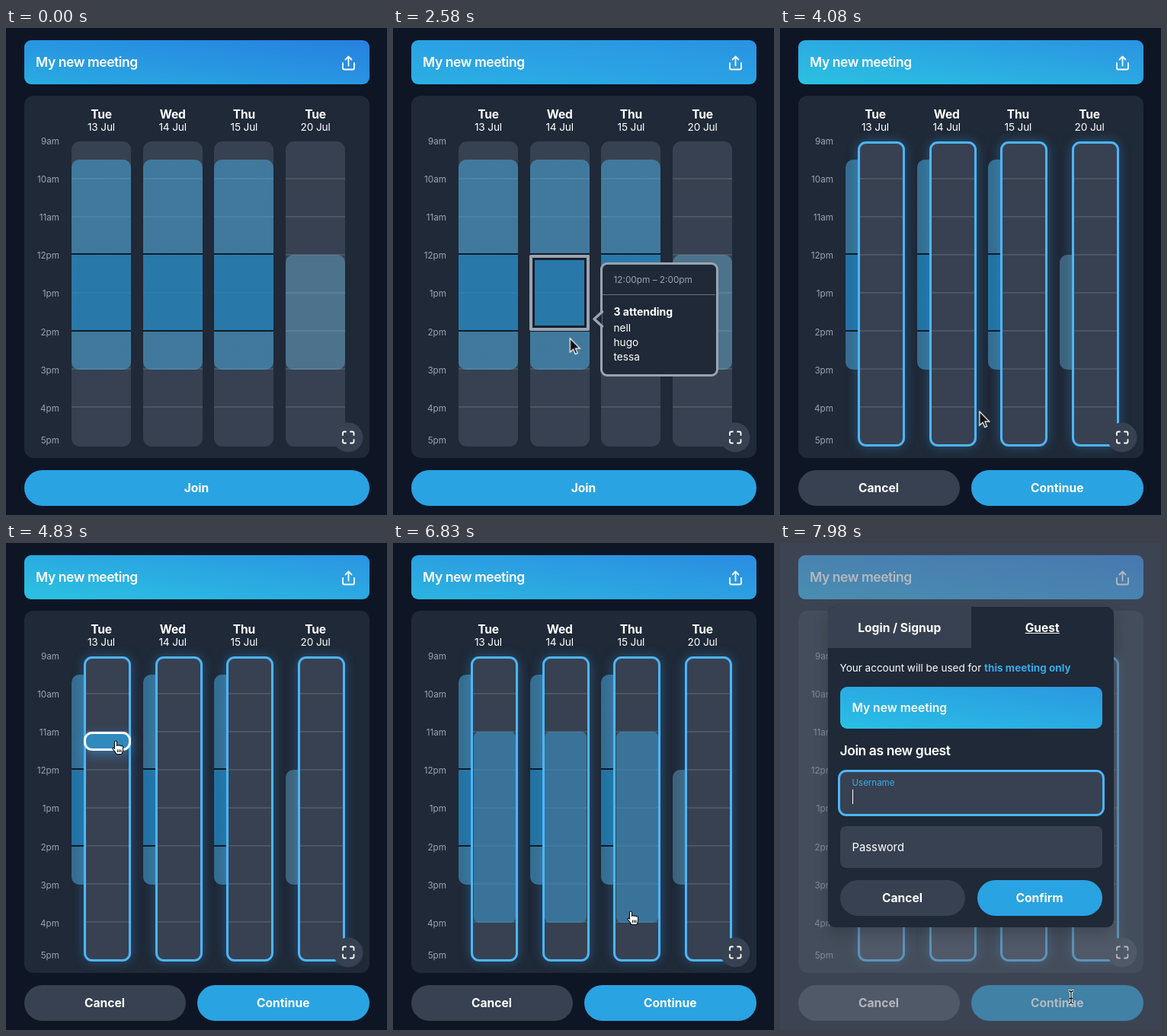
An HTML page for the animation above (8 s loop, 500 by 640 pixels).

```html
<!DOCTYPE html>
<html lang="en">
<head>
<meta charset="utf-8">
<title>Meeting planner</title>
<style>
@property --low { syntax: '<color>'; inherits: false; initial-value: #2aabe2; }
@property --high { syntax: '<color>'; inherits: false; initial-value: #2680e0; }
html, body { margin: 0; width: 100%; height: 100%; overflow: hidden; background: #0e1626; }
body { position: relative; color: #fff; font: 13.65px/20px Inter, sans-serif; }
div, svg.layer { position: absolute; box-sizing: border-box; }
svg.layer { left: 0; top: 0; width: 500px; height: 640px; fill: none; stroke: #fff; stroke-width: 1.8; stroke-linecap: round; stroke-linejoin: round; }
.text { white-space: pre; }
.banner { border-radius: 9px; background: linear-gradient(to top right, var(--low), var(--high)); }
.title { font-size: 17.55px; font-weight: 600; letter-spacing: -.44px; }
.strong { font-size: 15.6px; font-weight: 700; }
.center { text-align: center; }
.hour { left: 0; width: 70px; text-align: right; font-size: 11.7px; color: #9ca3af; }
.card { left: 23.5px; top: 89px; width: 453px; height: 476px; border-radius: 12px; background: #1f2937; }
.button { height: 47px; border-radius: 24px; font: 700 15.6px/48px Inter, sans-serif; text-align: center; background: #374151; }
.primary { background: #2aa3e2; }

.day { top: 148.5px; width: 78px; height: 401px; }
.name { left: 0; width: 78px; }
.track { right: 0; top: 0; height: 401px; border-radius: 11px; background: repeating-linear-gradient(transparent 0 47.5px, #4b5563 47.5px 49.5px, transparent 49.5px 50px) 0 0 / 100% 350px no-repeat #374151; }
.track::after { content: ''; position: absolute; inset: 0; border: 3.5px solid #4db5f8; border-radius: 11px; box-shadow: 0 0 15px rgba(60, 160, 235, .38); }
.busy { left: 0; top: 0; height: 401px; overflow: hidden; }
.block { left: 0; top: 24px; width: 78px; height: 276px; border-radius: 10px;
  --some: rgba(75, 177, 233, .5); --all: rgba(36, 140, 198, .75); --edge: #0f1b2b;
  background: linear-gradient(var(--some) 123.5px, var(--edge) 0 125.5px, var(--all) 0 224px, var(--edge) 0 226px, var(--some) 0); }
.block.few { top: 149.5px; height: 150.5px; background: rgba(121, 205, 250, .35); }
.pick { right: 0; top: 99.5px; width: 62px; border: 3.5px solid #fff; border-radius: 11px; background: rgba(46, 152, 208, .85); box-shadow: 0 5px 15px rgba(60, 160, 235, .5); }
.kept { right: 3.5px; top: 99.5px; width: 55px; height: 250.5px; border-radius: 7px; background: rgba(61, 143, 192, .65); }

.focus { left: 179px; top: 298px; width: 79px; height: 100px; border: 4px solid #9ca3af; box-shadow: inset 0 0 0 3px #16202f; border-radius: 2px; }
.tip { left: 272px; top: 308px; width: 155px; height: 150px; border: 3.5px solid #9ca3af; border-radius: 9px; background: #1f2937; }
.shade { inset: 0; background: rgba(107, 114, 128, .5); }
.dialog { left: 62.5px; top: 84px; width: 375px; height: 421px; border-radius: 9px; background: #1f2937; box-shadow: 0 8px 20px rgba(0, 0, 0, .2); }
.tab { left: 0; top: 0; width: 187.5px; height: 54px; border-radius: 9px 0 0 0; background: #374151; }
.field { left: 15.5px; width: 344px; height: 55px; border-radius: 8px; background: #374151; }
.pointer { left: 0; top: 0; width: 0; height: 0; }
.pointer svg { position: absolute; left: 0; top: 0; overflow: visible; }
</style>
</head>
<body>
<div class="banner" style="left:23.5px;top:15.5px;width:453px;height:58px"></div>
<div class="text title" style="left:39px;top:35px">My new meeting</div>
<div class="card"></div>
<div id="grid"></div>

<div class="hover">
  <div class="focus"></div>
  <div class="tip">
    <div style="left:0;top:38.5px;width:148px;height:1px;background:#6b7280"></div>
    <div class="text" style="left:14.5px;top:9.5px;font-size:11.8px;color:#9ca3af">12:00pm – 2:00pm</div>
    <div class="text" style="left:14.5px;top:51.5px;font-size:14px;font-weight:700">3 attending</div>
    <div class="text" style="left:14.5px;top:74px;line-height:19px">nell
hugo
tessa</div>
  </div>
  <svg class="layer"><path d="M274.5 373L264 382.5l10.5 9.5" fill="#1f2937" stroke="#9ca3af" stroke-width="3.5"/></svg>
</div>

<svg class="layer">
  <path d="M442 46v6.5a2 2 0 002 2h11a2 2 0 002-2V46M449.5 49.5v-12M445.5 41.5l4-4 4 4"/>
  <circle cx="449" cy="538" r="19.5" fill="#374151" stroke="none"/>
  <path d="M442 535v-2.500a2 2 0 012-2h2M452 530.500h2.500a2 2 0 012 2V535M456.500 541v2.500a2 2 0 01-2 2H452M446 545.500h-2a2 2 0 01-2-2V541"/>
</svg>

<div class="button primary join" style="left:23.5px;top:581px;width:453px">Join</div>
<div class="actions">
  <div class="button" style="left:23.5px;top:581px;width:212px">Cancel</div>
  <div class="button primary next" style="left:251px;top:581px;width:225.5px">Continue</div>
</div>

<div class="shade"></div>
<div class="dialog">
  <div class="tab"></div>
  <div class="text strong center" style="left:0;top:18px;width:187.5px">Login / Signup</div>
  <div class="text strong center" style="left:187.5px;top:18px;width:187.5px;text-decoration:underline">Guest</div>
  <div class="text" style="left:15.5px;top:70px;font-size:13.5px">Your account will be used for <b style="color:#38aae6">this meeting only</b></div>
  <div class="banner" style="left:15.5px;top:105px;width:344px;height:54.500px;--low:#29c0e5;--high:#2b97e0"></div>
  <div class="text strong" style="left:31.5px;top:123px;font-weight:600">My new meeting</div>
  <div class="text title" style="left:15.5px;top:179px">Join as new guest</div>
  <div class="field" style="top:217px;box-shadow:0 0 0 3px #4db5f8"></div>
  <div class="text" style="left:31.5px;top:221px;font-size:11.5px;color:#38aeee">Username</div>
  <div style="left:31.5px;top:240px;width:1.5px;height:19px;background:#fff"></div>
  <div class="field" style="top:288px"></div>
  <div class="text" style="left:31.5px;top:306px;font-size:14.8px">Password</div>
  <div class="button" style="left:15.5px;top:358.500px;width:164px">Cancel</div>
  <div class="button primary" style="left:195.5px;top:358.500px;width:164px">Confirm</div>
</div>

<div class="pointer">
  <svg class="arrow" width="1" height="1"><path d="M0 0V18.200L4.200 14.300 7 20.600 9.800 19.400 7.100 13.200H12.900Z" fill="#111" stroke="#fff" stroke-width="1.2"/></svg>
  <svg class="hand" width="1" height="1"><path transform="translate(-6.5 -1)" d="M5 11V2.500a1.500 1.500 0 013 0V8a1.400 1.400 0 012.800-.3 1.400 1.400 0 012.700.5 1.300 1.300 0 012.500.6v4c0 3-1.200 4.200-1.700 5.700H7.200C6.500 16 4 13.600 2.600 11.800c-.9-1.300 1-2.500 2.400-.8zM9 12.500v3.500M11.200 12.500v3.500M13.300 12.500v3.500" fill="#fff" stroke="#111" stroke-width="1.1"/></svg>
  <svg class="beam" width="1" height="1" fill="none">
    <path id="ibeam" d="M-3.500-8.500Q0-8.500 0-6V6Q0 8.500-3.500 8.500M3.500-8.500Q0-8.500 0-6M0 6Q0 8.500 3.500 8.500M-2 1.500h4" stroke="#fff" stroke-width="3"/>
    <use href="#ibeam" style="stroke:#111"/>
    <path d="M-3.500-8.500Q0-8.500 0-6V6Q0 8.500-3.500 8.500M3.500-8.500Q0-8.500 0-6M0 6Q0 8.500 3.500 8.500M-2 1.500h4" stroke="#111" stroke-width="1.3"/>
  </svg>
</div>

<script>
const LOOP = 8000;
const grid = document.getElementById('grid');

const days = [['Tue', '13 Jul'], ['Wed', '14 Jul'], ['Thu', '15 Jul'], ['Tue', '20 Jul']];
grid.innerHTML = days.map(([day, date], i) => `
  <div class="day day${i}" style="left:${86 + 93.7 * i}px">
    <div class="text name strong center" style="top:-44.5px;letter-spacing:-.2px">${day}</div>
    <div class="text name center" style="top:-28.5px;letter-spacing:-.15px">${date}</div>
    <div class="track"></div>
    <div class="busy"><div class="block ${i === 3 ? 'few' : ''}"></div></div>
    ${i < 3 ? '<div class="kept"></div><div class="pick"></div>' : ''}
  </div>`).join('') +
  ['9am', '10am', '11am', '12pm', '1pm', '2pm', '3pm', '4pm', '5pm'].map((label, i) =>
    `<div class="text hour" style="top:${i === 8 ? 532 : 139 + 50.1 * i}px">${label}</div>`).join('');

let rules = '';
let count = 0;

// Frames are [ms, declarations, easing towards the next frame].
function play(target, frames) {
  const name = 'k' + count++;
  const all = [[0, frames[0][1]], ...frames, [LOOP, frames.at(-1)[1]]];
  const steps = all.map(([ms, css, ease = 'linear']) =>
    `${ms / LOOP * 100}%{${css};animation-timing-function:${ease}}`).join('');
  rules += `@keyframes ${name}{${steps}}${target}{animation:${name} ${LOOP}ms infinite}`;
}

// Hard switches between two states during the given [from, to] ranges.
function toggle(target, on, off, ...ranges) {
  const frames = ranges.flatMap(([from, to]) => [[from, on, 'step-end'], [to, off, 'step-end']]);
  play(target, [[0, off, 'step-end'], ...frames]);
}
const show = (target, ...ranges) => toggle(target, 'opacity:1', 'opacity:0', ...ranges);
const tween = (target, from, to, start, end, ease) => play(target, [[start, from, ease], [end, to]]);

const move = (x, y) => `transform:translate(${x}px,${y}px)`;
const tint = (low, high) => `--low:${low};--high:${high}`;
const smooth = 'cubic-bezier(.65,0,.35,1)';

play('body > .banner', [
  [0, tint('#2aabe2', '#2680e0')], [2580, tint('#2bb0e4', '#2a92e3')],
  [3330, tint('#2bc2e2', '#2b90e1')], [6080, tint('#2bc2e1', '#2a97e3')],
  [7630, tint('#2ba8df', '#2c80e0')], [LOOP, tint('#2aabe2', '#2680e0')]
]);

// Pointer
play('.pointer', [
  [980, move(330, 645), 'ease-in-out'], [1780, move(212, 345)],
  [2180, move(212, 345), 'ease-in'], [2580, move(232, 407), 'ease-out'], [2980, move(311, 606)],
  [3780, move(311, 606), 'ease-in-out'], [4580, move(144, 260)],
  [5480, move(144, 260)], [6080, move(270, 430)], [6275, move(312, 484)],
  [7030, move(312, 484), 'ease-in-out'], [7600, move(382, 597)]
]);
show('.arrow', [980, 1116], [1228, 2880], [3932, 4084], [4276, 4404], [5580, 5725], [6025, 6168], [7340, 7460]);
show('.hand', [1116, 1228], [2880, 3932], [4084, 4276], [4404, 5580], [5725, 6025], [6168, 7340], [7460, 7530]);
show('.beam', [7530, LOOP]);

// Hover card
play('.hover', [[1580, 'opacity:0'], [1680, 'opacity:1'], [2600, 'opacity:1'], [2700, 'opacity:0']]);

// Buttons
const dark = 'background:#1691cc', light = 'background:#2aa3e2';
toggle('.join', dark, light, [1116, 1228], [2880, 3030]);
toggle('.next', dark, light, [3780, 3932], [7460, LOOP]);
show('.actions', [3030, LOOP]);
tween('.join', light, light + ';opacity:0', 3029, 3030);
toggle('.join', light + ';opacity:0', light, [3030, LOOP]);

// Columns make room for the new answer
tween('.track', 'width:78px', 'width:62px', 3230, 3500, smooth);
tween('.track::after', 'opacity:0', 'opacity:1', 3200, 3500, smooth);
tween('.busy', 'width:78px', 'width:16px', 3230, 3500, smooth);

// Dragging a selection, half an hour per step
[[4680, 4830], [5725, 5745], [6160, 6180]].forEach(([from, to], i) => {
  const size = (height, opacity) => `height:${height}px;opacity:${opacity}`;
  rules += `.day${i} .pick{--shown:0}`;
  play(`.day${i} .pick`, [[from, 'opacity:0'], [to, 'opacity:1'], [6330, 'opacity:1'], [6600, 'opacity:0']]);
});
play('.sized', [[5432, 'height:25px', 'steps(9,end)'], [6238, 'height:250.5px']]);
const sizing = 'k' + (count - 1);
[0, 1, 2].forEach(i => {
  const fading = 'k' + (count - 4 + i);
  rules += `.day${i} .pick{animation:${fading} ${LOOP}ms infinite,${sizing} ${LOOP}ms infinite}`;
});
tween('.kept', 'opacity:0', 'opacity:1', 6330, 6600);

// Dialog
tween('.shade', 'opacity:0', 'opacity:1', 7600, 7830, 'ease-in-out');
tween('.dialog', 'opacity:0;transform:scale(.95)', 'opacity:1;transform:none', 7620, 7880, 'ease-in-out');

const sheet = document.createElement('style');
sheet.textContent = rules;
document.head.append(sheet);
</script>
</body>
</html>
```
